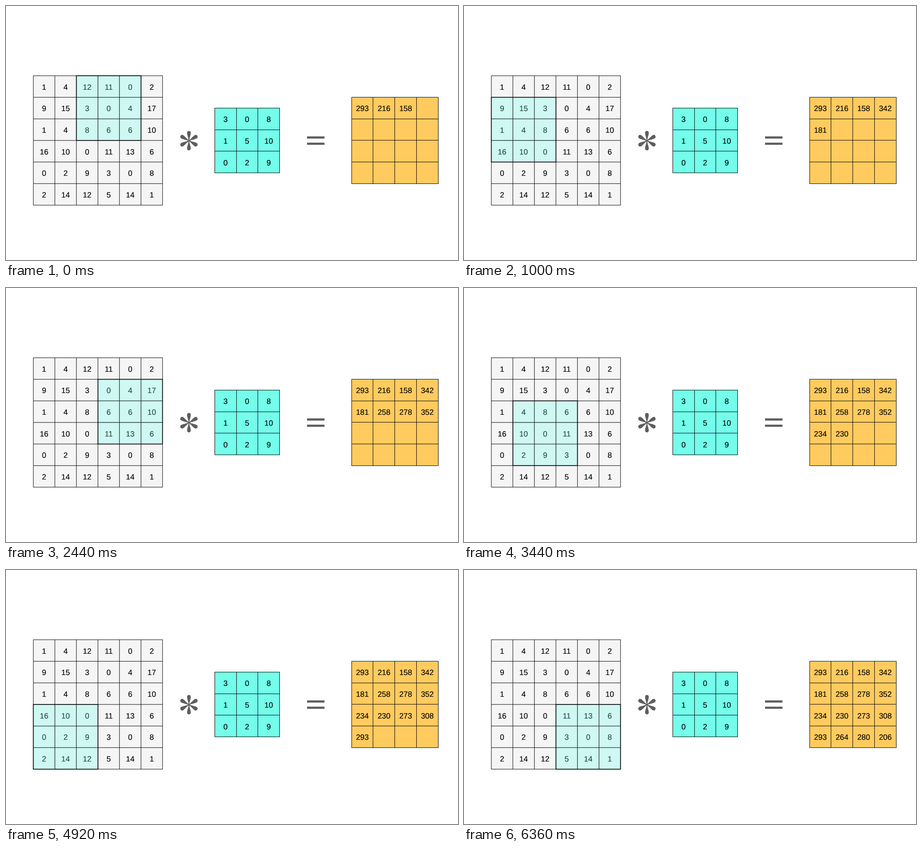
Write an HTML page that moves like this. It is 997x561 px and loops after 6.88 s.

```html
<!DOCTYPE html>
<html lang="en">
<head>
<meta charset="utf-8">
<title>Convolution</title>
<style>
  html, body { margin: 0; width: 100%; height: 100%; overflow: hidden; background: #fff; }
  svg { display: block; }
  text {
    font: 17px "Liberation Sans", Arial, sans-serif; text-anchor: middle;
    text-rendering: geometricPrecision; stroke: #000; stroke-width: .15px;
  }
  .line { stroke: #000; fill: none; }
  .sign { fill: #5e5e5e; }
</style>
</head>
<body>
<svg id="stage" width="997" height="561" viewBox="0 0 997 561">
  <defs>
    <path id="arm" d="M-.8 0 C-1 -7 -4.1 -12 -4.1 -17.3 C-4.1 -20 -2.5 -21.4 0 -21.4 S4.1 -20 4.1 -17.3 C4.1 -12 1 -7 .8 0Z"/>
  </defs>
</svg>
<script>
const stage = document.getElementById("stage");
const LOOP = 6880;
const STEPS = 14;
const TICK = 40;
const FIRST_CELL = 2;

const inputGrid = {
  x: 60.3, y: 154, dx: 47.5, dy: 47.65, fill: "#f5f5f5",
  labels: "1 4 12 11 0 2 / 9 15 3 0 4 17 / 1 4 8 6 6 10 / 16 10 0 11 13 6 / 0 2 9 3 0 8 / 2 14 12 5 14 1"
};
const kernelGrid = {
  x: 460.4, y: 225.5, dx: 47.6, dy: 47.6, fill: "#73fdea", crisp: true,
  labels: "3 0 8 / 1 5 10 / 0 2 9"
};
const outputGrid = {
  x: 762.2, y: 201.6, dx: 47.75, dy: 47.6, fill: "#ffcb5f", crisp: true,
  labels: "293 216 158 342 / 181 258 278 352 / 234 230 273 308 / 293 264 280 206"
};

function add(parent, tag, attrs, text) {
  const node = document.createElementNS("http://www.w3.org/2000/svg", tag);
  for (const key in attrs) node.setAttribute(key, attrs[key]);
  if (text !== undefined) node.textContent = text;
  return parent.appendChild(node);
}

const snap = (grid, value) => grid.crisp ? Math.floor(value) + .5 : value;
const lineX = (grid, i) => snap(grid, grid.x + grid.dx * i);
const lineY = (grid, i) => snap(grid, grid.y + grid.dy * i);

function box(grid, n) {
  const x = lineX(grid, 0), y = lineY(grid, 0);
  return { x, y, width: lineX(grid, n) - x, height: lineY(grid, n) - y };
}

function innerLines(grid, n) {
  let d = "";
  for (let i = 1; i < n; i++) {
    d += `M${lineX(grid, 0)} ${lineY(grid, i)}H${lineX(grid, n)}`;
    d += `M${lineX(grid, i)} ${lineY(grid, 0)}V${lineY(grid, n)}`;
  }
  return d;
}

function drawGrid(grid) {
  const rows = grid.labels.split(" / ").map(row => row.split(" "));
  const n = rows.length;
  add(stage, "rect", { ...box(grid, n), fill: grid.fill, stroke: "#000" });
  add(stage, "path", { class: "line", d: innerLines(grid, n) });
  return rows.flatMap((row, r) => row.map((label, c) => add(stage, "text", {
    x: grid.x + grid.dx * (c + .5), y: grid.y + grid.dy * (r + .5) + 7
  }, label)));
}

drawGrid(inputGrid);
drawGrid(kernelGrid);
const results = drawGrid(outputGrid);

for (let angle = 0; angle < 360; angle += 60) {
  add(stage, "use", { href: "#arm", class: "sign", transform: `translate(403.5 297.5) rotate(${angle})` });
}
for (const y of [288, 301.8]) {
  add(stage, "rect", { class: "sign", x: 664, y, width: 38.5, height: 4.8 });
}

// The sliding window is drawn once at the grid origin and moved by whole cells.
const patch = add(stage, "g", {});
const patchBox = box(inputGrid, 3);
add(patch, "rect", { ...patchBox, fill: "#73fdea", "fill-opacity": .29 });
add(patch, "path", { class: "line", d: innerLines(inputGrid, 3), "stroke-opacity": .5, "stroke-width": 1.2 });
add(patch, "rect", { ...patchBox, class: "line", "stroke-opacity": .75, "stroke-width": 1.9 });

function showCell(cell) {
  const dx = cell % 4 * inputGrid.dx, dy = Math.floor(cell / 4) * inputGrid.dy;
  patch.setAttribute("transform", `translate(${dx} ${dy})`);
  results.forEach((text, i) => text.setAttribute("visibility", i <= cell ? "visible" : "hidden"));
}

// Each step lasts 12 ticks; the first one and the end of each later row hold one tick more.
function stepStart(step) {
  const holds = Math.max(Math.min(step, 1), Math.floor((step + FIRST_CELL) / 4));
  return TICK * (12 * step + holds);
}

const started = performance.now();
function frame() {
  const time = (performance.now() - started) % LOOP;
  let step = 0;
  while (step + 1 < STEPS && stepStart(step + 1) <= time) step++;
  showCell(FIRST_CELL + step);
  requestAnimationFrame(frame);
}
frame();
</script>
</body>
</html>
```
